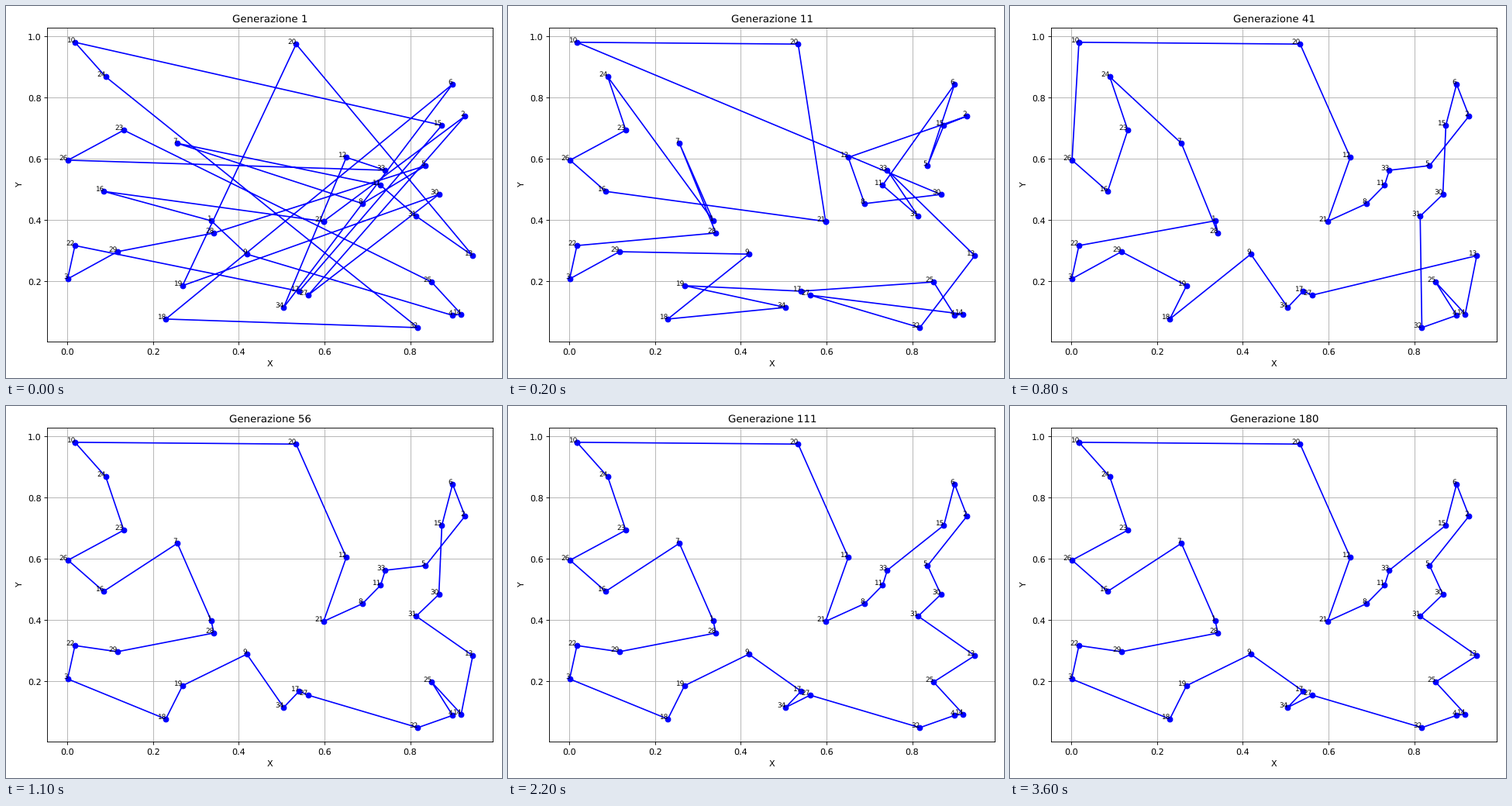
Write a matplotlib script that moves like this. It is 640 by 480 pixels and loops after 3.7 s.

```python
import matplotlib.pyplot as plt
import numpy as np
from matplotlib.animation import FuncAnimation

plt.rcParams["text.hinting"] = "none"

WIDTH, HEIGHT, DPI = 640, 480, 80
FRAMES, INTERVAL = 37, 100
STEP, LAST_GEN = 5, 180
SETTLED = 6

# Numbered cities in the order of the first settled tour
CITIES = {
    10: (.018, .981), 20: (.534, .975), 12: (.651, .605), 21: (.598, .396),
    8: (.689, .454), 30: (.867, .484), 15: (.874, .710), 2: (.928, .740),
    6: (.899, .844), 5: (.836, .578), 33: (.742, .563), 11: (.731, .514),
    31: (.814, .413), 32: (.818, .049), 14: (.919, .093), 13: (.946, .284),
    4: (.899, .089), 25: (.850, .198), 27: (.562, .155), 17: (.541, .168),
    34: (.505, .115), 9: (.419, .289), 18: (.230, .077), 19: (.269, .186),
    29: (.117, .297), 3: (.001, .208), 22: (.018, .317), 1: (.336, .398),
    28: (.342, .358), 7: (.257, .651), 24: (.090, .868), 23: (.132, .694),
    16: (.085, .494), 26: (.002, .596),
}

# Improvements by reversing the stretch between two cities
REVERSALS = [(30, 11), (6, 2), (13, 25), (14, 4), (32, 13), (16, 26), (24, 16),
             (18, 19), (1, 28), (3, 22), (29, 3), (14, 25), (17, 34), (5, 15)]

names = np.array(list(CITIES))
jitter = np.random.default_rng(4).random(len(names))


def tour_at(n):
    # Fading jitter on each city's rank: once below 1 the order is settled
    spread = 2 * len(names) / (n + 1) ** 2.2
    tour = list(names[np.argsort(np.arange(len(names)) + spread * jitter)])
    done = max(0, 11 * (n - SETTLED) // 5)
    for first, last in REVERSALS[:done]:
        i, j = tour.index(first), tour.index(last) + 1
        tour[i:j] = tour[i:j][::-1]
    return tour


def path(n):
    tour = tour_at(n)
    return np.array([CITIES[city] for city in tour + tour[:1]]).T


fig, ax = plt.subplots(figsize=(WIDTH / DPI, HEIGHT / DPI), dpi=DPI)
fig.subplots_adjust(left=53.4 / WIDTH, right=628.4 / WIDTH,
                    bottom=1 - 433.4 / HEIGHT, top=1 - 28.4 / HEIGHT)
line, = ax.plot(*path(0), "bo-")
for city, (x, y) in CITIES.items():
    ax.text(x, y, str(city), fontsize=8, ha="right")
title = ax.set_title("Generazione 1")
ax.set_xlabel("X")
ax.set_ylabel("Y")
ax.grid(True)


def update(n):
    line.set_data(*path(n))
    title.set_text(f"Generazione {min(1 + STEP * n, LAST_GEN)}")
    return line, title


anim = FuncAnimation(fig, update, frames=FRAMES, interval=INTERVAL,
                     repeat=True, repeat_delay=0)
plt.show()
```
